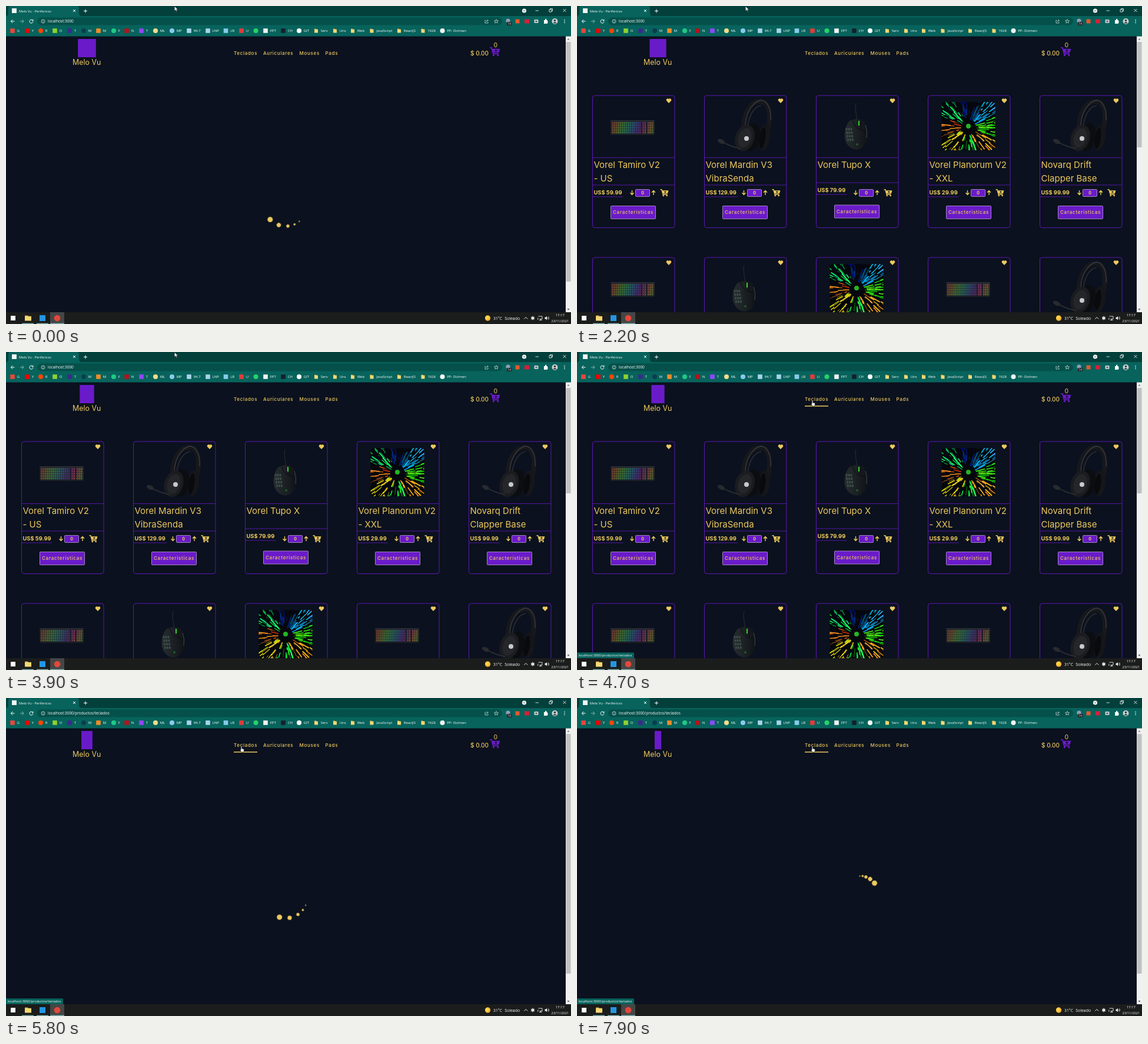
Write an HTML page that moves like this. It is 960 by 540 pixels and loops after 8 s.

```html
<!DOCTYPE html>
<html lang="es">
<head>
<meta charset="utf-8">
<title>Melo Vu - Perifericos</title>
<style>
  html, body { margin: 0; width: 100%; height: 100%; overflow: hidden; background: #0b111e; }
  svg { position: absolute; left: 0; top: 0; font-family: "Open Sans", "Noto Sans", sans-serif; }
  .site { font-family: Inter, sans-serif; }
  #spinner { position: absolute; left: 453px; top: 313.5px; width: 1em; height: 1em;
    font-size: 45px; border-radius: 50%; color: #edc95e; }
</style>
</head>
<body>
<svg id="page" width="960" height="540" viewBox="0 0 960 540"></svg>
<div id="spinner"></div>
<svg id="overlay" width="960" height="540" viewBox="0 0 960 540"></svg>
<script>
const GOLD = '#edc95e', PURPLE = '#6a1bc9', BG = '#0b111e', TEAL = '#07635c', EDGE = '#5c17b5';
const LOOP = 8000, SHOWN = 2100, HOVER = 4620, CLICKED = 4960;
const $ = id => document.getElementById(id);

const text = (x, y, size, s, attrs = '') =>
  `<text x="${x}" y="${y}" font-size="${size}" fill="#fff" ${attrs}>${s}</text>`;
const rect = (x, y, w, h, fill, attrs = '') =>
  `<rect x="${x}" y="${y}" width="${w}" height="${h}" fill="${fill}" ${attrs}/>`;
const dot = (x, y, r, fill, attrs = '') => `<circle cx="${x}" cy="${y}" r="${r}" fill="${fill}" ${attrs}/>`;
const oval = (x, y, rx, ry, fill, turn = 0) =>
  `<ellipse cx="${x}" cy="${y}" rx="${rx}" ry="${ry}" fill="${fill}" transform="rotate(${turn} ${x} ${y})"/>`;
const line = (d, stroke = '#fff', width = 1, attrs = '') =>
  `<path d="${d}" fill="none" stroke="${stroke}" stroke-width="${width}" ${attrs}/>`;
const shape = (d, fill, attrs = '') => `<path d="${d}" fill="${fill}" ${attrs}/>`;
const at = (x, y, body, scale = 1) => `<g transform="translate(${x} ${y}) scale(${scale})">${body}</g>`;
const folder = (x, y, w, h) =>
  rect(x, y, w * .5, h * .4, '#e0a93a', 'rx=".6"') + rect(x, y + h * .15, w, h * .85, '#f6d873', 'rx=".6"');

const cart = (x, y, color, scale = 1) => at(x, y,
  line('M0 .8H2.4L4.6 9H12', color, 1.4) + shape('M2.8 2.2H14L12.4 7.4H4Z', color) +
  dot(5.2, 11, 1.3, color) + dot(11.2, 11, 1.3, color) + line('M8.4 3.1V6.5M6.7 4.8H10.1', BG, 1), scale);

// Product pictures, in card coordinates
function keyboard() {
  let s = rect(31, 42, 75, 25, '#1d2026', 'rx="1.5"') + rect(31, 42, 75, 2, '#2a2e35', 'rx="1"');
  for (let i = 0; i < 5; i++) {
    const y = 46.8 + i * 4;
    s += line(`M33 ${y}H82.5M85 ${y}H92M94 ${y}H104.5`, 'url(#rainbow)', 3, 'stroke-dasharray="2.5 .9"') +
      line(`M33.7 ${y}H104`, '#15181d', 1, 'stroke-dasharray="1.2 2.2"');
  }
  return s;
}
const headset = () =>
  line('M67 61C65 29 80 10 95 10C112 10 114 36 108 60', '#17181c', 8) +
  line('M70 50C71 28 83 11 96 8C108 8 114 24 113 42', '#3a3c42', 1.3) +
  line('M74 55C75 36 84 19 97 17', '#26282d', 2) +
  oval(102, 71, 10, 22, '#15161a', 8) + oval(99, 72, 5, 18, '#090a0d', 8) +
  oval(81, 71, 14, 24, '#0c0d10', 12) + oval(69, 72, 16, 23, '#1b1c20', 18) +
  oval(69, 72, 11, 17, '#24262a', 18) + dot(72, 73, 4, '#c9c9cc') +
  line('M62 90Q44 87 28 77', '#2c2d32', 2) + oval(29, 78, 6.5, 3.6, '#292b2f', 25);
function mouse() {
  let s = line('M69 41C70 32 65 25 68 13', '#20242a', 1.6) +
    shape('M56 44Q70 36 82 44Q90 57 87 76Q81 91 69 92Q53 90 49 73Q47 56 56 44Z', 'url(#shell)') +
    line('M62 42Q66 58 83 60M78 42Q76 50 76 58', '#0b0d10', 1) +
    line('M73 43V51', '#35d32d', 2) + line('M84 50Q88 60 86 72', '#444a50', 1);
  for (let i = 0; i < 12; i++)
    s += rect(50.5 + i % 3 * 4 + (i / 3 | 0) * .8, 55 + (i / 3 | 0) * 6, 3, 4.3, '#3c4c46', 'rx="1"');
  return s + dot(70, 83, 2, '#1d5a2a');
}
function pad() {
  const hues = [95, 25, 115, 45, 12, 130, 215, 185];
  let seed = 7, s = rect(23.5, 11, 91, 82, '#05070d');
  const random = () => (seed = seed * 16807 % 2147483647) / 2147483647;
  for (let i = 0; i < 250; i++) {
    const turn = random() * 8, a = turn * Math.PI / 4, r = 12 + random() * 44, end = r + 4 + random() * 16;
    const upward = turn > 5.3 && turn < 6.7;
    s += line(`M${(69 + r * Math.cos(a)).toFixed(1)} ${(54 + r * Math.sin(a)).toFixed(1)}` +
      `L${(69 + end * Math.cos(a)).toFixed(1)} ${(54 + end * Math.sin(a)).toFixed(1)}`,
      `hsl(${hues[Math.round(turn) % 8] + random() * 25} 95% ${upward ? 25 : 38 + random() * 22}%)`,
      .6 + random() * 1.3);
  }
  return `<g clip-path="url(#mat)">${s}</g>` + dot(69, 52, 4, '#25b524');
}

const products = [
  [keyboard, 'Vorel Tamiro V2', '- US', '59.99'],
  [headset, 'Vorel Mardin V3', 'VibraSenda', '129.99'],
  [mouse, 'Vorel Tupo X', '', '79.99'],
  [pad, 'Vorel Planorum V2', '- XXL', '29.99'],
  [headset, 'Novarq Drift', 'Clapper Base', '99.99']
];
const gold = `style="fill:${GOLD}"`;
function card([picture, title, title2, price], x, y) {
  const lift = title2 ? 0 : 4, rule = 152 - lift, base = 172.5 - lift;
  const top = lift ? 185.5 : 187, underline = price.length * 4.9 + 28;
  return at(x, y,
    rect(.5, 0, 139.5, 224.5, 'none', `rx="4" stroke="${EDGE}"`) + picture() +
    shape('M4.5 8L.6 4A2.35 2.35 0 0 1 4.5 1.2A2.35 2.35 0 0 1 8.4 4Z', GOLD, 'transform="translate(125.5 5)"') +
    line(`M0 105.5H140M0 ${rule}H140M0 ${base - .5}H${underline}`, EDGE, .9) +
    text(2.5, 122.5, 15, title, gold) + text(2.5, 145.5, 15, title2, gold) +
    text(2.5, 168 - lift, 9.4, 'US$ ' + price, gold + ' font-weight="700"') +
    line('M67.5 161V168.3M64.5 165.3L67.5 168.5L70.5 165.3M104 169V161.7M101 164.7L104 161.5L107 164.7', GOLD, 1.4) +
    rect(73.5, 159.5, 24, 12, PURPLE, 'rx="1" stroke="#b9a5cf" stroke-width=".8"') +
    text(85.5, 168, 7, '0', gold + ' font-weight="700" text-anchor="middle"') +
    cart(115.5, 159, GOLD) +
    rect(31.5, top + .5, 76, 22, PURPLE, 'rx="1" stroke="#b9a5cf" stroke-width=".8"') +
    text(35, top + 14.3, 8, 'Caracteristicas', gold + ' font-weight="500" letter-spacing=".75"'));
}
const rows = [[0, 1, 2, 3, 4], [0, 2, 3, 0, 4]];
const cards = rows.map((row, r) =>
  row.map((p, c) => card(products[p], 26 + 190 * c, 152 + 275 * r)).join('')).join('');

const links = [[387, 'Teclados'], [437, 'Auriculares'], [498.5, 'Mouses'], [542.5, 'Pads']];

$('page').innerHTML = `
  <defs>
    <linearGradient id="rainbow" gradientUnits="userSpaceOnUse" x1="31" y1="42" x2="106" y2="67">
      ${[0, 25, 95, 150, 205, 265, 330, 40, 130].map((h, i) =>
        `<stop offset="${i / 8}" stop-color="hsl(${h} 50% 38%)"/>`).join('')}
    </linearGradient>
    <linearGradient id="shell"><stop stop-color="#262d2f"/><stop offset=".6" stop-color="#1a1e22"/>
      <stop offset="1" stop-color="#0f1215"/></linearGradient>
    <clipPath id="mat"><rect x="23.5" y="11" width="91" height="82" rx="5"/></clipPath>
  </defs>
  ${rect(0, 51, 960, 469, BG)}
  <g class="site">
    <g id="logo">${rect(-15.5, 56, 31, 31, PURPLE)}</g>
    ${text(137.2, 100, 12.4, 'Melo Vu', gold + ' text-anchor="middle"')}
    ${links.map(([x, s]) => text(x, 83, 8, s, gold + ' font-weight="500" letter-spacing=".7"')).join('')}
    ${rect(387, 91, 40, 1.5, GOLD, 'id="underline"')}
    ${text(789, 84, 10, '$ 0.00', gold + ' font-weight="500"')}
    ${text(831.8, 69.7, 10.5, '0', gold + ' text-anchor="middle"')}
    ${cart(822, 70, PURPLE, 1.24)}
    <g id="cards">${cards}</g>
  </g>`;

// x, icon colour, label, round icon
const bookmarks = [
  [11, '#e8473b', 'G'], [36, '#f00000', 'Y'], [59, '#ff4500', 'R', 1], [83, '#8fd12f', 'O'],
  [108, '#3b2a8c', 'T'], [132, '#0c3c50', 'M', 1], [157, '#f28c28', 'M'], [183, '#20c985', 'F', 1],
  [205, '#b5121b', 'N'], [230, '#9146ff', 'T'], [254, '#f3dc8b', 'ML', 1], [282, '#8cc9ee', 'MP', 1],
  [311, '#a6d4ea', '94.7'], [343, '#a6d4ea', 'LNP'], [373.5, '#86cbe8', 'LB'], [400, '#e23b3b', 'U'],
  [424.5, '#25d366', '', 1], [441, '#f2f2f2', 'FPT'], [471, '#16202a', 'CH'], [498, '#fff', 'GIT', 1],
  [527, 0, 'Serv'], [559, 0, 'Uns'], [589, 0, 'Web'], [621.5, 0, 'JavaScript'], [668, 0, 'ReactJS'],
  [708.5, 0, '1928'], [741.5, '#f5f5f5', 'PP- Dolmen', 1]
];
const bookmark = ([x, color, label, round]) =>
  (!color ? folder(x - 3, 38.5, 6, 7) : round ? dot(x, 42, 4, color) : rect(x - 3.8, 38.2, 7.6, 7.6, color)) +
  text(x + 7.7, 44.2, 6, label);

const browser =
  rect(0, 0, 960, 17, '#033f3b') + rect(0, 17, 960, 34.5, TEAL) +
  shape('M0 17Q4 17 4 12V4Q4 0 8 0H120Q124 0 124 4V12Q124 17 128 17Z', TEAL) +
  rect(10, 4, 8, 8, '#f4f4f4') + text(22, 10.6, 5.75, 'Melo Vu - Perifericos') +
  line('M114 6L118 10M118 6L114 10M132 8.5H138M135 5.5V11.5') +
  dot(880.5, 8, 3.6, '#fff') + line('M878.8 7.3L880.5 9L882.2 7.3', '#033f3b') +
  line('M899.5 8H905M946.5 5L951.5 10M951.5 5L946.5 10M923 6H927V10H923ZM924.5 6V4.5H928.5V8.5H927', '#fff', .8) +
  line('M14.5 26H8.5M11.3 23L8.3 26L11.3 29') +
  line('M24 26H30M27.2 23L30.2 26L27.2 29', '#8ab5b0') +
  line('M45.6 24.6A3 3 0 1 0 46 26.5M46 22.8V25H43.8') +
  rect(53, 19.5, 790, 13, '#05504a', 'rx="6.5"') +
  dot(63, 26, 3, 'none', 'stroke="#d8e8e6" stroke-width=".8"') + line('M63 25.5V27.8M63 24.2V24.9', '#d8e8e6', .8) +
  text(71, 28.4, 6.5, '', 'id="address"') +
  line('M815 24H814V29H819V27M816 27Q816 24.5 819 24.5M817.6 23L819.4 24.5L817.6 26', '#d8e8e6', .7) +
  line('M833 22.6L834 25H836.5L834.5 26.6L835.3 29L833 27.6L830.7 29L831.5 26.6L829.5 25H832Z', '#d8e8e6', .7) +
  dot(853, 25, 3.6, '#8f9db4') + rect(851, 27, 8.5, 6, '#22252c', 'rx="1.5"') + text(852.5, 32, 4.6, '14') +
  rect(865.5, 22.5, 7, 7, '#e4572e') + rect(881, 22.5, 8, 7, '#d51f3a') +
  rect(897.5, 23, 7, 6, '#c7cdd0', 'rx="1"') + dot(901, 26, 1.6, '#586268') +
  shape('M914 24H916V23A1.2 1.2 0 0 1 918.4 23V24H920V26A1.2 1.2 0 0 1 920 28.3V30H914Z', '#fff') +
  dot(932.5, 26, 5, '#c9ced0') + dot(932.5, 24.4, 1.7, '#28383b') + shape('M929.3 29.5Q932.5 24.5 935.7 29.5Z', '#28383b') +
  [23.5, 26, 28.5].map(y => dot(949, y, .8, '#fff')).join('') +
  bookmarks.map(bookmark).join('');

const scrollbar = rect(951, 51.5, 9, 468.5, '#f1f1f1') + rect(951.5, 61, 8, 407, '#c1c1c1', 'id="thumb"') +
  shape('M953.5 57.5L955.5 55L957.5 57.5Z', '#777') + shape('M953.5 514L955.5 516.5L957.5 514Z', '#505050');

const taskbar = rect(0, 520, 960, 20, '#1b1c1c') + rect(75, 520, 24, 20, '#454646') +
  rect(8, 526, 8, 8, '#fff') + folder(32, 525.5, 11, 9) + rect(57, 525, 10, 10, '#2395e2') +
  dot(87, 530, 5.3, '#e4483a') +
  [[27, 20], [52, 20], [75, 24]].map(([x, w]) => rect(x, 538.7, w, 1.3, '#82b9b4')).join('') +
  dot(818.5, 530, 4.7, '#f7b731') + dot(817.5, 529, 3, '#ffd34f') +
  text(828, 532.7, 6.8, '31°C') + text(847.3, 532.7, 6.9, 'Soleado') +
  line('M880.3 531.5L883.3 528.5L886.3 531.5', '#fff', .9) +
  [0, 60, 120].map(a => line('M895 526.8V533.2', '#fff', 1.4, `transform="rotate(${a} 895 530)"`)).join('') +
  line('M904.5 527H911V531.5H906.5M908.5 531.5V533.5M906 533.5H910.5M903.8 529.5V533', '#fff', .8) +
  shape('M915.5 528.7H917L919 526.7V533.3L917 531.3H915.5Z', '#fff') +
  line('M920.3 528.5Q921.5 530 920.3 531.5M921.6 527.3Q923.6 530 921.6 532.7', '#fff', .7) +
  text(941.3, 527.3, 6, '17:17', 'text-anchor="middle"') + text(941.3, 537, 5.6, '23/11/2021', 'text-anchor="middle"');

$('overlay').innerHTML = browser + scrollbar +
  `<g id="status">${rect(-2, 510.3, 99, 9.7, TEAL, 'rx="1.5"') + text(2.5, 517.2, 5.65, 'localhost:3000/productos/teclados')}</g>` +
  taskbar +
  shape('M0 0V8L2 6.2L3.3 9L4.5 8.4L3.2 5.8H5.7Z', '#fff', 'id="arrow" stroke="#111" stroke-width=".5"') +
  shape('M1.2 1Q2 -.2 2.8 1V4L5.7 4.7Q6.6 5 6.4 6L5.8 9.8H2.3L0 6.6Q0 5.4 1.2 6Z', '#fff',
    'id="hand" stroke="#111" stroke-width=".5" transform="translate(398 82)"');

// Comet loader: the tail opens and closes while the whole turns
const tail = points => {
  const xy = points.split(' ');
  return ['0 -.83', ...[0, 1, 2, 3].map(i => xy[i].replace(',', ' '))]
    .map((p, i) => `${p.replace(/(\S+) (\S+)/, '$1em $2em')} 0 ${[-.4, -.42, -.44, -.46, -.477][i]}em ${GOLD}`).join(',');
};
const closed = tail('0,-.83 0,-.83 0,-.83 0,-.83');
const short = tail('-.087,-.825 -.173,-.812 -.256,-.789 -.297,-.775');
const wide = tail('-.338,-.758 -.555,-.617 -.671,-.488 -.749,-.34');
const full = tail('-.377,-.74 -.645,-.522 -.775,-.297 -.82,-.09');
const frames = [[0, closed], [.05, closed], [.1, short], [.2, wide], [.38, full], [.59, short], [.95, closed], [1, closed]]
  .map(([offset, boxShadow]) => ({ offset, boxShadow, easing: 'ease' }));
const turn = [{ transform: 'rotate(0deg)', easing: 'ease' }, { transform: 'rotate(360deg)' }];
const loader = [frames, turn].map(k => {
  const a = $('spinner').animate(k, { duration: 1000, iterations: Infinity });
  a.pause();
  return a;
});

const show = (id, on) => $(id).style.display = on ? '' : 'none';
const smooth = (t, a, b) => {
  const k = Math.min(1, Math.max(0, (t - a) / (b - a)));
  return k * k * (3 - 2 * k);
};

function draw() {
  const t = performance.now() % LOOP;
  const listed = t >= SHOWN && t < CLICKED, hover = t >= HOVER;
  const cycle = t < SHOWN ? .363 + t / 2576 : Math.max(0, .007 + (t - 5000) / 2580);
  loader.forEach(a => a.currentTime = cycle * 1000);
  show('spinner', !listed);
  show('cards', listed);
  $('thumb').setAttribute('height', listed ? 179 : 407);
  const spin = Math.cos((8 + 7.7 * t / 1000) * Math.PI / 180);
  $('logo').setAttribute('transform', `translate(137.5 0) scale(${spin} 1)`);
  const k = smooth(t, 4000, HOVER);
  $('arrow').setAttribute('transform', `translate(${286.3 + 113.5 * k} ${.4 + 82 * k})`);
  show('arrow', !hover);
  show('hand', hover);
  show('underline', hover);
  show('status', t >= HOVER + 80);
  $('address').textContent = 'localhost:3000' + (t >= CLICKED ? '/productos/teclados' : '');
  requestAnimationFrame(draw);
}
draw();
</script>
</body>
</html>
```
